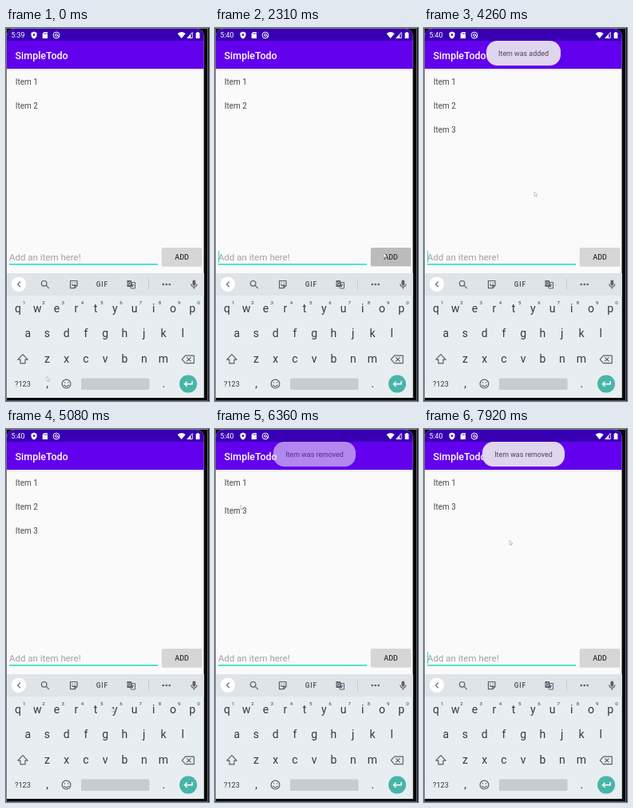
An HTML page that plays this animation: 254 px wide and 467 px high, repeating every 8000 ms.

```html
<!DOCTYPE html>
<html lang="en">
<head>
<meta charset="utf-8">
<title>Todo list</title>
<style>
  html, body { margin: 0; width: 100%; height: 100%; overflow: hidden; background: #000; }
  svg { display: block; width: 254px; height: 467px; font-family: Roboto, "Open Sans", sans-serif; }
  .mid { text-anchor: middle; }
  .bold { font-weight: 500; }
  .line { fill: none; stroke: #5a6066; stroke-width: 1.2; stroke-linecap: round; stroke-linejoin: round; }
</style>
</head>
<body>
<svg viewBox="0 0 254 467" xmlns="http://www.w3.org/2000/svg">
  <defs>
    <linearGradient id="shade" x2="0" y2="1">
      <stop stop-color="#000" stop-opacity=".1"/><stop offset="1" stop-color="#000" stop-opacity="0"/>
    </linearGradient>
    <clipPath id="screen"><path d="M1 463V11q0-10 10-10H237.5q10 0 10 10V463z"/></clipPath>
  </defs>
  <rect width="254" height="467" fill="#08080a"/>
  <path d="M.5 467V.5H252.5V467" fill="none" stroke="#77777b"/>
  <path d="M0 466.5H253" stroke="#55555a"/>

  <g clip-path="url(#screen)">
    <rect width="248" height="464" fill="#fafafa"/>
    <rect width="248" height="16" fill="#3700b3"/>
    <rect y="16" width="248" height="35" fill="#6200ee"/>
    <rect y="51" width="248" height="3" fill="url(#shade)"/>
    <rect y="307" width="248" height="157" fill="#e8edf1"/>
    <rect y="307" width="248" height="28" fill="#dfe4e8"/>
  </g>

  <g fill="#fff">
    <text id="clock" x="6.5" y="12.2" font-size="8.8"></text>
    <path d="M35 4.6l3.5 1.4v2.7q0 3.3-3.5 4.8q-3.5-1.5-3.5-4.8V6z"/>
    <circle cx="35" cy="8.6" r="1.3" fill="#3700b3"/>
    <path d="M47.7 5H52V13H45.7V7z"/>
    <path d="M48.2 6v2m1.4-2v2m1.4-2v2" stroke="#3700b3" stroke-width=".6"/>
    <g fill="none" stroke="#fff">
      <circle cx="63" cy="9" r="3.9"/>
      <circle cx="63" cy="8.9" r="1.5"/><path d="M64.3 8.8l2 2.6"/>
    </g>
    <path d="M214.6 7q5-4 10 0l-5 6z"/>
    <path d="M226.8 12.5L233.2 5.5v7z" fill="none" stroke="#fff" stroke-width=".9"/>
    <path d="M227 12.6l4.2-4.6v4.6z"/>
    <path d="M237.6 6h1.3v-1h2.2v1h1.3v7h-4.8z"/>
    <text class="bold" x="11.5" y="38.8" font-size="12.5">SimpleTodo</text>
  </g>

  <g font-size="10" fill="#4a4a4a">
    <text x="11.7" y="70.5">Item 1</text>
    <text id="second" x="11.7" y="100.5">Item 2</text>
    <text id="third" x="11.7">Item 3</text>
  </g>

  <text id="field" x="4" y="291" font-size="11.5"></text>
  <rect x="4" y="295" width="186" height="1.8" fill="#3fe0d2"/>
  <rect id="caret" x="4" y="279" width="1.3" height="15" fill="#3fe0d2"/>
  <rect x="194.6" y="276" width="51" height="23" rx="2" fill="#000" opacity=".1"/>
  <rect id="button" x="195" y="275" width="50" height="23" rx="1.5"/>
  <text class="mid bold" x="220" y="289.6" font-size="8.9" fill="#333">ADD</text>

  <circle cx="16" cy="321.2" r="9.5" fill="#000" opacity=".06"/>
  <circle cx="16" cy="320.8" r="9.4" fill="#fff"/>
  <path class="line" d="M17.6 317.8l-3 3 3 3"/>
  <g id="tools">
    <g class="line">
      <circle cx="47.7" cy="319.8" r="3.3"/><path d="M50.2 322.3l3.3 3.4"/>
      <path d="M80.5 316.5h8.5v6l-3 3.2h-5.5zM89 322.5h-3v3M82.8 321.5q1.8 2 3.6 0M83 318.9v.1m3.4-.1v.1"/>
      <path d="M158 318.5h3.5v7.5h-5l-1-2" stroke-width="1"/>
      <path d="M158.3 323.6l1.3-2.8" stroke-width=".9"/>
    </g>
    <path d="M151.5 316h5.3l2.4 8h-7.7z" fill="#5a6066"/>
    <path d="M155.9 318.6a1.8 1.8 0 1 0 .4 1.6h-1.5" fill="none" stroke="#dfe4e8" stroke-width=".8"/>
    <text class="mid" x="120.4" y="323.8" font-size="8.4" font-weight="700" letter-spacing=".8" fill="#5a6066">GIF</text>
    <path d="M178.5 314v14" stroke="#c6cbd0"/>
    <g fill="#5a6066"><circle cx="196.7" cy="321" r="1.3"/><circle cx="200.7" cy="321" r="1.3"/><circle cx="204.7" cy="321" r="1.3"/></g>
  </g>
  <g id="words" class="mid" font-size="9.5" fill="#30353a">
    <text x="60" y="324.5"></text><text class="bold" x="126" y="324.5"></text><text x="193" y="324.5"></text>
    <path d="M93 314v14M159 314v14" stroke="#c6cbd0"/>
  </g>
  <rect x="233.4" y="315.6" width="3.8" height="7" rx="1.9" fill="#5a6066"/>
  <path class="line" d="M231.8 320.8q.4 3.4 3.5 3.4t3.5-3.4M235.3 324.3v2"/>

  <g id="keys" class="mid" fill="#353a40"></g>
  <g class="line">
    <path d="M21 408.7l6.2 6.4h-3.2v4.8h-6v-4.8h-3.2z"/>
    <path d="M224.5 410.2h10.7v9.4h-10.7l-4.3-4.7zM226.5 412.6l4.6 4.6m0-4.6l-4.6 4.6"/>
    <circle cx="75.5" cy="445.6" r="5.4"/><path d="M72.6 447.2q2.9 3.2 5.8 0M73.5 443.7v.2m4-.2v.2"/>
  </g>
  <text class="mid" x="21" y="449.2" font-size="9.2" fill="#353a40">?123</text>
  <rect x="94" y="438.5" width="85.5" height="14.5" rx="1.5" fill="#c7ccd0"/>
  <circle cx="228" cy="445.6" r="11" fill="#48b5a7"/>
  <path d="M233 442v3.8h-9.5m3-3l-3 3 3 3" fill="none" stroke="#fff" stroke-width="1.5"/>

  <g id="toast">
    <rect id="bubble" y="16" height="31" rx="13.5" fill="#e0d5ee"/>
    <text id="message" class="mid" x="124.5" y="35" font-size="8.9" fill="#4c4756"></text>
  </g>
  <path id="mouse" d="M0 0V5.4L1.3 4.4 2.2 6.4 3.1 6 2.3 4 4 3.8z" fill="#fff" stroke="#8c8c92" stroke-width=".5"/>
</svg>
<script>
const $ = id => document.getElementById(id);
const LOOP = 8000, ROW = 30;
const [left, middle, right] = $('words').querySelectorAll('text');

const text = (x, y, value, size = 14) =>
  $('keys').insertAdjacentHTML('beforeend', `<text x="${x}" y="${y}" font-size="${size}">${value}</text>`);
[['qwertyuiop', 15, 356], ['asdfghjkl', 27.2, 387], ['zxcvbnm', 51.5, 419]].forEach(([row, x0, y], r) =>
  [...row].forEach((key, i) => {
    const x = x0 + i * 24.25;
    text(x, y, key);
    if (r === 0) text(x + 7.7, 345.5, (i + 1) % 10, 6.2);
  }));
text(51.7, 449.5, ',');
text(197.3, 449.5, '.');

const ramp = (t, a, b) => Math.min(1, Math.max(0, (t - a) / (b - a)));
const ease = p => (1 - Math.cos(Math.PI * p)) / 2;
const latest = (list, t) => list.reduce((found, item) => item[0] <= t ? item : found);

const typing = [[0, ''], [140, 'I'], [270, 'It'], [420, 'Ite'], [570, 'Item'], [850, 'Item '], [970, 'Item 3'], [2310, '']];
const caretFlips = [140, 1470, 1970, 2810, 3310, 3810, 4260, 4780, 5240, 5740, 6740, 7210, 7700];

// time, x, y; a trailing true glides on to the next point
const path = [
  [0, 51, 436.5], [1370, 51, 436.5, true], [1850, 190, 300, true], [2050, 207, 272, true], [2200, 211, 282],
  [3100, 211, 282, true], [3520, 138, 205], [5080, 133, 349], [5220, 146, 410], [5340, 151, 461],
  [5460, -20, -20], [5740, 32, 95], [7640, 32, 95, true], [7900, 107, 139.5]
];

function mouseAt(t) {
  const point = latest(path, t);
  const [start, x, y, glide] = point;
  if (!glide) return [x, y];
  const [end, nx, ny] = path[path.indexOf(point) + 1];
  const p = ramp(t, start, end);
  return [x + (nx - x) * p, y + (ny - y) * p];
}

function draw(t) {
  $('clock').textContent = t < 420 ? '5:39' : '5:40';

  const typed = latest(typing, t)[1];
  const field = $('field');
  field.textContent = typed || 'Add an item here!';
  field.setAttribute('fill', typed ? '#242424' : '#a0a0a0');
  const width = typed ? field.getComputedTextLength() + (typed.endsWith(' ') ? 2.8 : 0) : 0;
  $('caret').setAttribute('x', 4 + width);
  $('caret').setAttribute('opacity', caretFlips.filter(f => f <= t).length % 2);

  $('tools').setAttribute('opacity', typed ? 0 : 1);
  $('words').setAttribute('opacity', typed ? 1 : 0);
  const word = typed.trim();
  left.textContent = word && word + 's';
  middle.textContent = word;
  right.textContent = word.toLowerCase();

  const press = ramp(t, 2180, 2310) * (1 - ramp(t, 2610, 2900));
  const grey = Math.round(214 - 27 * press);
  $('button').setAttribute('fill', `rgb(${grey},${grey},${grey})`);

  $('second').setAttribute('opacity', 1 - ramp(t, 6180, 6260));
  $('third').setAttribute('opacity', ramp(t, 2590, 2720));
  $('third').setAttribute('y', 130.5 - ROW * ease(ramp(t, 6200, 6425)));

  const removed = t > 5500;
  const half = removed ? 51.5 : 46.5;
  $('message').textContent = removed ? 'Item was removed' : 'Item was added';
  $('bubble').setAttribute('x', 124.5 - half);
  $('bubble').setAttribute('width', half * 2);
  $('toast').setAttribute('opacity', removed ? ramp(t, 6220, 6440)
    : ramp(t, 2640, 2900) * (1 - ramp(t, 4370, 4800)));

  $('mouse').setAttribute('transform', `translate(${mouseAt(t)})`);
}

const begin = performance.now();
function frame() {
  draw((performance.now() - begin) % LOOP);
  requestAnimationFrame(frame);
}
frame();
</script>
</body>
</html>
```
